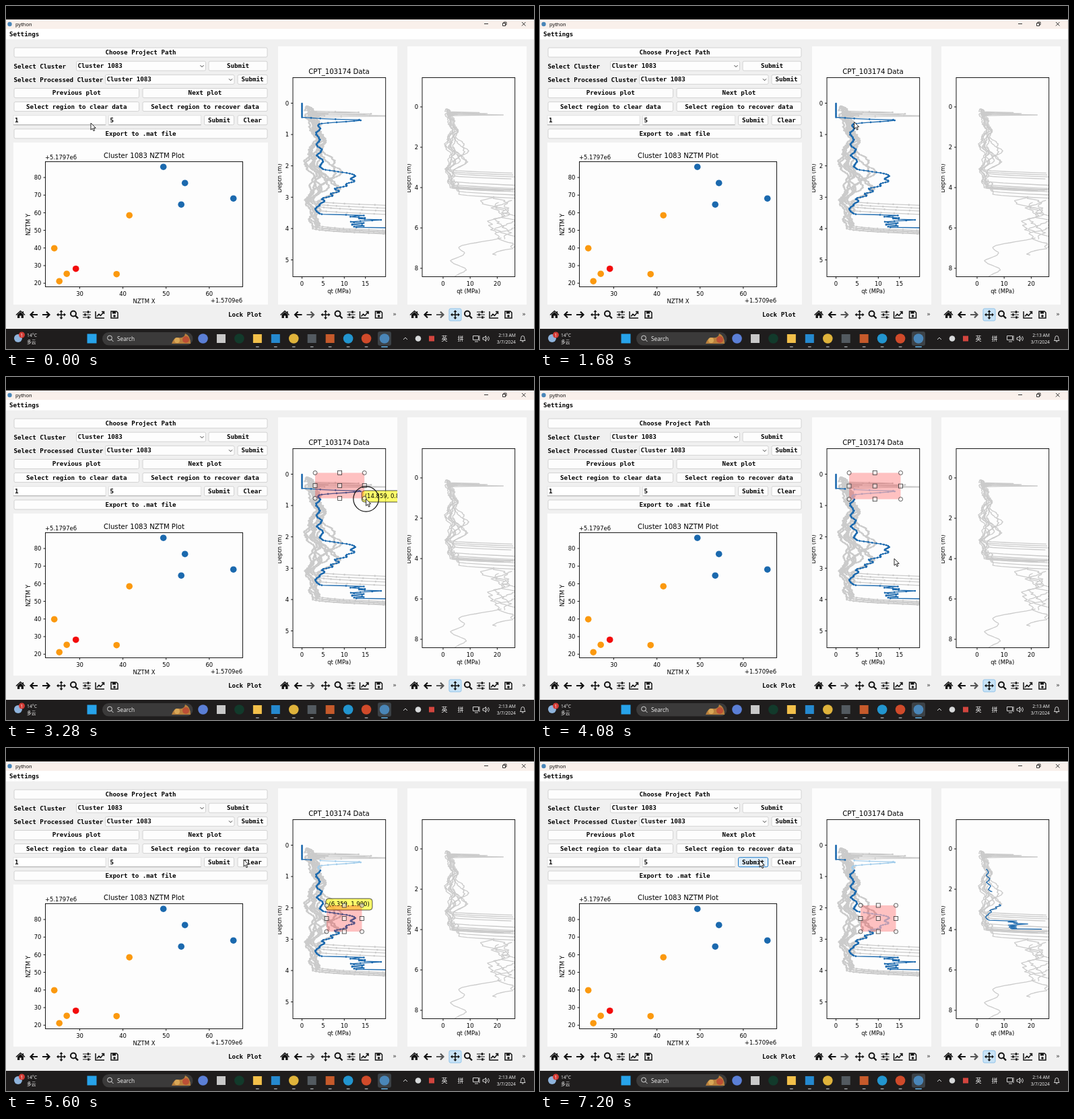
Write an HTML page that moves like this. It is 784x510 px and loops after 7.28 s.

```html
<!DOCTYPE html>
<html lang="en">
<head>
<meta charset="utf-8">
<title>Cluster plots</title>
<style>
  html, body { margin: 0; width: 100%; height: 100%; overflow: hidden; background: #000; }
  svg { display: block; }
  text { white-space: pre; }
  .ui { font: bold 9.2px "DejaVu Sans Mono", monospace; }
  .plot { font: 8.45px "DejaVu Sans", sans-serif; }
  .title { font-size: 10.15px; }
  .sys { font: 6.8px "Open Sans", "Noto Sans CJK SC", "Noto Sans CJK", sans-serif; }
  .big { font-size: 9px; }
  .btn { fill: #fdfdfd; stroke: #d2d2d2; }
  .axes { fill: none; stroke: #000; stroke-width: .9; }
  .curve { fill: none; stroke-width: 1.3; stroke-linejoin: round; }
  .dots { fill: none; stroke-width: 2.7; stroke-linecap: round; }
  .icon { fill: none; stroke: #111; stroke-width: 1.5; }
  .icon .solid { fill: #111; stroke: none; }
  .thin { fill: none; stroke: #222; stroke-width: .9; }
  .tray { fill: none; stroke: #e8e8e8; stroke-width: .9; }
  .gray { stroke: #cbcbcb; }
  .blue { stroke: #1b69ae; }
  .pale { stroke: #a3cdeb; }
  .active .btn { fill: #e2eff9; stroke: #1a78c8; }
</style>
</head>
<body>
<svg id="stage" width="784" height="510" viewBox="0 0 784 510"></svg>
<script>
const LOOP = 7280, STEP = 80;
const svg = document.getElementById('stage');

// ---------- markup helpers ----------
const rect = (x, y, w, h, a = '') => `<rect x="${x}" y="${y}" width="${w}" height="${h}" ${a}/>`;
const disc = (x, y, r, a = '') => `<circle cx="${x}" cy="${y}" r="${r}" ${a}/>`;
const path = (d, a = '') => `<path d="${d}" ${a}/>`;
const label = (s, x, y, anchor = 'start', a = '') => `<text x="${x}" y="${y}" text-anchor="${anchor}" ${a}>${s}</text>`;
const vertical = (s, x, y) => label(s, 0, 0, 'middle', `transform="translate(${x} ${y}) rotate(-90)"`);
const fill = c => `fill="${c}"`;
const times = (n, f) => Array.from({ length: n }, (_, i) => f(i));

const row = n => 62 + 20.15 * n;
function button(s, n, x, w, id = '') {
  return `<g id="${id}">${rect(x, row(n), w, 14, 'class="btn" rx="2"')}${label(s, x + w / 2, row(n) + 10, 'middle')}</g>`;
}
function combo(s, n, x, w) {
  const y = row(n);
  return rect(x, y, w, 14, 'class="btn" rx="2"') + label(s, x + 2, y + 10) +
    path(`M${x + w - 8} ${y + 6}l2.5 2.5l2.5 -2.5`, 'class="thin"');
}
function input(s, n, x, w) {
  const y = row(n);
  return rect(x, y, w, 14, 'fill="#fff" stroke="#e2e2e2"') + path(`M${x} ${y + 14}h${w}`, 'stroke="#aaa"') + label(s, x + 2, y + 10);
}
// xs and ys give the first tick's position, its value, and the steps of both.
function axes(x, y, w, h, xs, ys) {
  let d = '', t = '';
  for (let [p, v, dp, dv] = [xs.at, xs.from, xs.gap, xs.by]; p < x + w; p += dp, v += dv) {
    d += `M${p} ${y + h}v3`;
    t += label(v, p, y + h + 13, 'middle');
  }
  for (let [p, v, dp, dv] = [ys.at, ys.from, ys.gap, ys.by]; p < y + h; p += dp, v += dv) {
    d += `M${x} ${p}h-3`;
    t += label(v, x - 6, p + 3.2, 'end');
  }
  return rect(x, y, w, h, 'class="axes"') + path(d, 'class="axes"') + t;
}
const ticks = (at, gap, from, by) => ({ at, gap, from, by });

function toolbar(dx, next) {
  const arrow = 'M6 0H-4M0 -4.5L-4.5 0L0 4.5';
  const at = (x, s) => `<g transform="translate(${x} 459)">${s}</g>`;
  const head = times(4, i => path('M0 -7l-2.5 3h5z', `class="solid" transform="rotate(${i * 90})"`)).join('');
  return `<g class="icon" transform="translate(${dx} 0)">` +
    at(21.5, path('M-6.5 .5L0 -5.5L6.5 .5M3.8 -5v3') + path('M-4.5 0L0 -4L4.5 0V5H1.2V1.5H-1.2V5H-4.5Z', 'class="solid"')) +
    at(41, path(arrow, 'stroke-width="2.2"')) +
    at(60, path(arrow, `stroke-width="2.2" transform="scale(-1 1)" stroke="${next}"`)) +
    at(82, path('M-5 0H5M0 -5V5') + head) +
    at(101, disc(-1, -1.5, 4, 'stroke-width="2"') + path('M2 1.5L6 5.5', 'stroke-width="2.4"')) +
    at(120, path('M-6 -4H6M-6 0H6M-6 4H6', 'stroke-width="1.2"') + path('M2 -5.7v3.4M-2.5 -1.7v3.4M2.5 2.3v3.4', 'stroke-width="2.4"')) +
    at(139, path('M-6 -5V5H7M-4 2.5L-1 -1L1.5 1.5L6 -4M3 -4.5h3.5v3.5')) +
    at(161, path('M-5 -5H3L5 -3V5H-5Z') + rect(-3, -5, 5, 3.5, 'class="solid"') + disc(0, 2, 1.8, 'class="solid"')) +
    '</g>';
}

// ---------- curves, in pixels of the middle plot ----------
const DY = .93;
function random(seed) {
  return () => {
    seed = seed * 1664525 + 1013904223 >>> 0;
    return seed / 4294967296;
  };
}
function wander(seed, size) {
  const r = random(seed);
  let n = 0;
  return () => n = n * .8 + (r() - .5) * size;
}
const bell = (v, w) => Math.exp(-v * v / (w * w));
const peak = (y, c, up, down) => bell(y - c, y < c ? up : down);
function trace(from, to, f, step = DY) {
  const pts = [];
  for (let y = from; y <= to; y += step) pts.push([f(y), y]);
  return pts;
}

const jitter = wander(7, 2.4);
const main = trace(145, 331, y => {
  if (y < 167) return y < 166 ? 439.5 : 453;
  if (y > 309) {
    const rise = 464 + 58 * Math.min(1, (y - 309) / 2.5);
    return rise + 11 * Math.sin(y * 1.6) + 38 * bell(y - 317.8, 1) + 60 * Math.max(0, y - 329);
  }
  const drift = 465 + .1 * Math.min(30, y - 210) - 6 * bell(y - 300, 12);
  return drift + 3 * Math.sin((y - 194) * .39) + 66 * peak(y, 169.5, 1.3, 4) +
    51 * peak(y, 251.5, 5.5, 25) + 5 * bell(y - 270, 20) * Math.sin(y * .85) + jitter();
});

const others = times(9, i => {
  const r = random(i * 77 + 5), noise = wander(i * 31 + 9, 3);
  const base = 9 + i * 4 % 9 * 1.7, early = 3 + r() * 15, phase = r() * 6;
  const spike = i % 3 ? 8 + r() * 22 : 82 + i * 8, spikeY = 158 + i * .9;
  const bump = i % 2 ? 6 + r() * 10 : 24 + r() * 18, mid = 228 + r() * 45, wide = 9 + r() * 14;
  const end = i < 4 ? 289 + i * 4.5 : 322 + i * 1.2;
  return trace(149 + r() * 2, end + 9, y => {
    const x = 440 + base * (1 - Math.exp((148 - y) / 9)) + spike * bell(y - spikeY, 1.1) +
      early * bell(y - 190, 22) + bump * bell(y - mid, wide) +
      3.5 * Math.sin(y / 9 + phase) + 2.5 * Math.sin(y / 4 + phase * 2) + noise() +
      130 * (Math.max(0, y - end) / 8) ** 1.8;
    return Math.max(440, x);
  });
});

// Deeper readings, in pixels of the right plot.
const deep = [
  ...times(4, i => {
    const n = wander(40 + i, 12);
    return trace(283 + i * 3, 336 + i * 12, y => 727 + i * 7 + 14 * Math.sin(y / 6 + i * 2) + n(), 1.6);
  }),
  ...times(5, i => {
    const n = wander(60 + i, 3);
    return trace(252 + i * 3, 267 + i * 5, y => 657 + i * 4 + n() + 110 * (Math.max(0, y - 260 - i * 5) / 7) ** 1.5);
  }),
  trace(345, 403, y => 668 + 62 * Math.exp((345 - y) / 9) + 9 * Math.sin(y / 3.4) + 12 * bell(y - 397, 7) + jitter(), 1.4)
];

const toRight = ([x, y]) => [649 + (x - 439.5) * .64, 150 + (y - 145) * .645];
const xy = ([x, y]) => x.toFixed(1) + ' ' + y.toFixed(1);
const always = () => true;
function line(pts, keep = always, map = p => p) {
  let open = false, d = '';
  for (const p of pts) {
    const on = keep(p);
    if (on) d += (open ? 'L' : 'M') + xy(map(p));
    open = on;
  }
  return d;
}
const dots = (pts, keep = always) => pts.filter(keep).map(p => `M${xy(p)}h.01`).join('');
const grayLine = (pts, map) => path(line(pts, always, map), 'class="curve gray"');

const first = [459, 142.5, 535.5, 182], second = [476, 234, 528.5, 273];
const inBox = ([x, y], b) => x > b[0] && x < b[2] && y > b[1] && y < b[3];

// ---------- static picture ----------
const spots = {
  '#1b69ae': [[234, 239.5], [266, 263.5], [338, 286.5], [260.5, 295.5]],
  '#fb990f': [[183.5, 311.5], [72, 360.5], [90.5, 398.5], [79.5, 409.5], [164.5, 399]],
  '#f30b0b': [[104, 391]]
};

function frame() {
  return rect(0, 20, 784, 14.5, fill('#f9f0eb')) + rect(0, 34, 784, 16, fill('#fff')) + rect(0, 49.5, 784, 431, fill('#f0f0f0')) +
    disc(5.5, 27, 3.2, fill('#4a86b8')) + label('python', 14, 30, 'start', 'class="sys" style="font-size:7.5px"') +
    path('M710 26.5h6M737.5 25.5h4v4h-4zM739 25.5v-1.5h4v4h-1.5M766 24l5.5 5.5M771.5 24l-5.5 5.5', 'class="thin"');
}
function form() {
  return '<g class="ui">' + label('Settings', 5, 45.3) +
    button('Choose Project Path', 0, 12, 376) +
    label('Select Cluster', 11.5, 92.5) + combo('Cluster 1083', 1, 104.5, 192) + button('Submit', 1, 301, 87) +
    label('Select Processed Cluster', 11.5, 112.5) + combo('Cluster 1083', 2, 147.5, 191.5) + button('Submit', 2, 344, 44) +
    button('Previous plot', 3, 12, 185.5) + button('Next plot', 3, 203, 185) +
    button('Select region to clear data', 4, 12, 185.5) + button('Select region to recover data', 4, 203, 185) +
    input('1', 5, 11, 137) + input('5', 5, 152.5, 137) + button('Submit', 5, 294.5, 44, 'send') + button('Clear', 5, 344, 44) +
    button('Export to .mat file', 6, 12, 376) + label('Lock Plot', 330, 462) + '</g>';
}
function scatter() {
  const marks = Object.entries(spots).map(([c, list]) => list.map(([x, y]) => disc(x - .3, y - .3, 4.8, fill(c))).join('')).join('');
  return '<g class="plot">' + rect(11, 203, 378, 241, fill('#fdfdfd')) +
    axes(58.5, 231.5, 293, 186, ticks(109.5, 64.1, 30, 10), ticks(255, 26.2, 80, -10)) +
    label('Cluster 1083 NZTM Plot', 205, 226, 'middle', 'class="title"') +
    label('+5.1797e6', 58, 228) + label('+1.5709e6', 351, 441, 'end') +
    label('NZTM X', 205, 442, 'middle') + vertical('NZTM Y', 36, 325) + marks + '</g>';
}
function panel(x, name, curves, scale, extra) {
  return `<g class="plot" clip-path="url(#panel${name})">` + rect(x, 60, 177, 384, fill('#fdfdfd')) +
    `<g clip-path="url(#axes${name})">${curves}</g>` + axes(x + 22, 106.5, 137.7, 296, ...scale) +
    label('qt (MPa)', x + 90.7, 426.5, 'middle') + vertical('Depth (m)', x + 4.8, 256) + extra + '</g>';
}
function middle() {
  const curves = others.map(p => grayLine(p) + path(dots(p), 'class="dots gray"')).join('') +
    ['pale', 'blue'].map(c => `<path id="${c}Line" class="curve ${c}"/><path id="${c}Dots" class="dots ${c}"/>`).join('');
  const extra = label('CPT_103174 Data', 494.5, 101.3, 'middle', 'class="title"') +
    '<g id="tip">' + rect(-4.5, -13.5, 69, 17, 'rx="4" fill="#ffff32" fill-opacity=".72" stroke="#222" stroke-width=".8"') +
    '<text id="tipText" y="-2"></text></g><g id="region"></g>';
  return panel(404, 'A', curves, [ticks(439.5, 31.4, 0, 5), ticks(144.5, 46.6, 0, 1)], extra);
}
function right() {
  const curves = others.map(p => grayLine(p, toRight)).join('') + deep.map(p => grayLine(p)).join('') +
    path(line(main, p => p[1] > 191 && !inBox(p, second), toRight), 'id="result" class="curve blue"');
  return panel(596, 'B', curves, [ticks(649, 40.2, 0, 10), ticks(150, 60, 0, 2)], '');
}
function bars() {
  const more = x => label('»', x, 461, 'middle', 'class="plot" style="font-size:9px" fill="#333"');
  return toolbar(0, '#111') + toolbar(392.5, '#555') + rect(658, 450, 18, 18, 'rx="2" fill="#c9e3f6" stroke="#8fc3ea"') +
    toolbar(585, '#555') + more(577) + more(769);
}
function apps() {
  const colors = 'o#5b7fd6 s#c9c9c9 o#123a2b s#f2c04a s#2589cf o#dfb33b s#535a60 s#c65a2b o#2295cf o#d04a2a o#4a86b8'.split(' ');
  return colors.map((c, i) => {
    const x = 292.5 + i * 26.95, color = fill(c.slice(1)), last = i === colors.length - 1;
    return (last ? rect(x - 10, 484, 20, 21, 'rx="3" fill="#3c4247"') : '') +
      (c[0] === 'o' ? disc(x, 494.5, 7.3, color) : rect(x - 6.5, 488, 13, 13, color)) +
      (last ? rect(x - 5, 506, 10, 1.6, 'rx=".8" fill="#65b5e8"') : i > 2 ? rect(x - 2.5, 506, 5, 1.5, 'rx=".7" fill="#969a9d"') : '');
  }).join('');
}
function taskbar() {
  return '<g class="sys" fill="#f2f2f2">' + rect(0, 480, 784, 30, fill('#1f1d1d')) +
    disc(18, 494, 6, fill('#8fb4dc')) + disc(23.5, 489, 4.5, fill('#d23b35')) + label('1', 23.5, 491.5, 'middle') +
    label('14°C', 31, 492) + label('多云', 31, 501.5) +
    rect(120.5, 487.5, 14, 14, fill('#27a3ea')) + rect(143, 485, 134.5, 19.5, 'rx="9.7" fill="#3b3a3a"') +
    disc(154, 493.5, 3.4, 'class="tray"') + path('M156.5 496l3 3', 'class="tray"') +
    label('Search', 165, 497.5, 'start', 'style="font-size:8.3px"') +
    path('M246 502q3 -10 11 -9t9 -6q8 3 8 15z', fill('#b9803d')) + disc(254, 497, 4, fill('#d9a757')) + disc(267, 496, 5, fill('#bb4f35')) +
    apps() + path('M590 496l3 -3l3 3', 'class="tray"') + disc(612, 494.5, 4.3, fill('#d8dadb')) + rect(628, 490.5, 8, 8, fill('#d2453e')) +
    label('英', 651, 498, 'middle', 'class="big"') + label('拼', 675, 498, 'middle', 'class="big"') +
    path('M693.5 490.5h8v6h-8zM696 499h5M703 490v8M708 493h2l2.5 -2.5v8l-2.5 -2.5h-2zM714 492.5q2 2 0 4M716 491q3 3.5 0 7', 'class="tray"') +
    label('', 757, 492, 'end', 'id="clock"') + label('3/7/2024', 757, 502, 'end') +
    path('M763.5 497.5h7.5q-1.2 -1.5 -1.2 -4q0 -3 -2.5 -3t-2.5 3q0 2.5 -1.3 4zM766 499h2.5', 'class="tray"') + '</g>';
}

const clips = [['A', 404], ['B', 596]].map(([name, x]) =>
  `<clipPath id="panel${name}">${rect(x, 60, 177, 384)}</clipPath>` +
  `<clipPath id="axes${name}">${rect(x + 22, 106.5, 137.7, 296)}</clipPath>`).join('');
svg.innerHTML = `<defs>${clips}</defs>` + frame() + form() + scatter() + middle() + right() + bars() + taskbar() +
  '<g id="cursor">' + disc(0, 0, 18.8, 'id="press" fill="none" stroke="#111" stroke-width="1.2"') +
  path('M0 0V10.2L2.4 8L4 11.8L5.7 11L4.1 7.4H7.2Z', 'fill="#fff" stroke="#111" stroke-width=".9"') + '</g>';

// ---------- motion ----------
const $ = id => document.getElementById(id);
const show = (id, on) => $(id).style.display = on ? '' : 'none';
const within = (t, a, b) => t >= a && t < b;

// Pointer stops: time, x, y.
const stops = [[160, 126, 174], [1120, 479, 222], [2080, 459, 142.5], [2400, 491, 164], [3360, 535.5, 181.7],
  [4080, 526, 270], [4240, 528.5, 273], [4800, 476, 234], [5600, 353, 166], [5840, 326, 167]];
function pointer(t) {
  const i = stops.findIndex(s => s[0] > t);
  if (i < 1) return (i ? stops[stops.length - 1] : stops[0]).slice(1);
  const [t0, x0, y0] = stops[i - 1], [t1, x1, y1] = stops[i];
  const u = (t - t0) / (t1 - t0), e = u * u * (3 - 2 * u);
  return [x0 + (x1 - x0) * e, y0 + (y1 - y0) * e];
}

const tips = [
  { from: 1040, to: 1360, q: 3.21, depth: 1.39 },
  { from: 2880, to: 3520, q: 14.859, depth: .81 },
  { from: 4720, to: 5680, q: 6.359, depth: 1.99 }
];
const drags = [
  { from: 2480, end: 3360, x: 459, y: 142.5 },
  { from: 4320, end: 4800, x: 528.5, y: 273 }
];

function selection(t) {
  const drag = drags.findLast(d => t >= d.from);
  if (!drag) return '';
  const [bx, by] = pointer(Math.min(t - STEP, drag.end));
  const span = (a, b) => [Math.min(a, b), (a + b) / 2, Math.max(a, b)];
  const xs = span(drag.x, bx), ys = span(drag.y, by);
  const style = 'fill="#fff" fill-opacity=".5" stroke="#333" stroke-width=".8"';
  const handles = xs.flatMap((x, i) => ys.map((y, j) =>
    i !== 1 && j !== 1 ? disc(x, y, 3, style) : rect(x - 3, y - 3, 6, 6, style)));
  return rect(xs[0], ys[0], xs[2] - xs[0], ys[2] - ys[0], 'fill="#f00" fill-opacity=".24"') + handles.join('');
}

let cleared = -1;
function setCleared(n) {
  if (n === cleared) return;
  cleared = n;
  const gone = p => [first, second].slice(0, n).some(b => inBox(p, b));
  const keep = { pale: gone, blue: p => !gone(p) };
  for (const c in keep) {
    $(c + 'Line').setAttribute('d', line(main, keep[c]));
    $(c + 'Dots').setAttribute('d', dots(main, keep[c]));
  }
}

function draw(t) {
  const [x, y] = pointer(t);
  $('cursor').setAttribute('transform', `translate(${x} ${y})`);
  show('press', within(t, 2080, 3440) || within(t, 4240, 4960) || within(t, 6000, 6160));
  const tip = tips.find(k => within(t, k.from, k.to));
  show('tip', tip);
  if (tip) {
    $('tip').setAttribute('transform', `translate(${439.5 + tip.q * 6.28} ${144.7 + tip.depth * 46.6})`);
    $('tipText').textContent = `(${tip.q.toFixed(3)}, ${tip.depth.toFixed(3)})`;
  }
  $('region').innerHTML = selection(t);
  setCleared(t < 3600 ? 0 : t < 5680 ? 1 : 2);
  $('send').setAttribute('class', t >= 5840 ? 'active' : '');
  show('result', t >= 6480);
  $('clock').textContent = t < 6480 ? '2:13 AM' : '2:14 AM';
}

const start = performance.now();
function tick() {
  const t = Math.max(0, performance.now() - start) % LOOP;
  draw(Math.floor(t / STEP) * STEP);
  requestAnimationFrame(tick);
}
tick();
</script>
</body>
</html>
```
